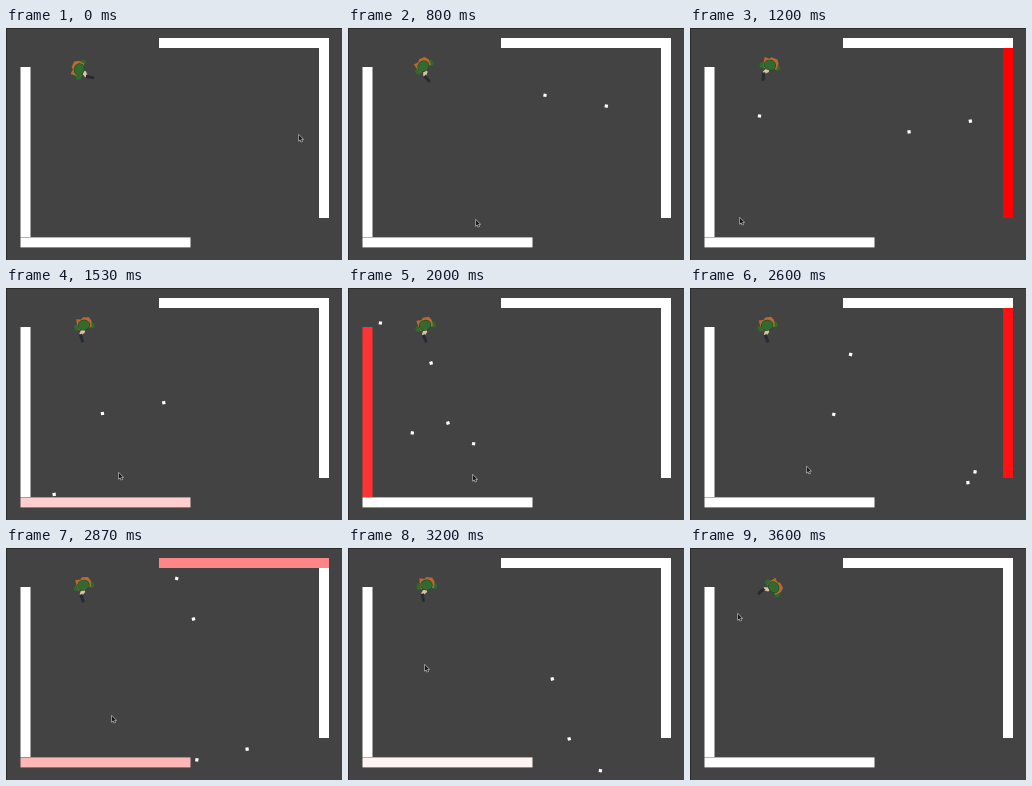
These frames come from a looping animation (336 px wide and 232 px high, 3800 ms). An HTML page with a canvas:

```html
<!DOCTYPE html>
<html lang="en">
<head>
<meta charset="utf-8">
<title>Bouncing bullets</title>
<style>
  html, body { margin: 0; height: 100%; overflow: hidden; background: #434343; }
  canvas { display: block; }
</style>
</head>
<body>
<canvas id="stage" width="336" height="232"></canvas>
<script>
const W = 336, H = 232, LOOP = 3800, STEP = 1000 / 15;
const SPEED = 24.9, RADIUS = 0.8, SHOT_GAP = 2.5;   // lengths in px, times in steps
const ctx = document.getElementById('stage').getContext('2d');
const player = { x: 79, y: 43 };

const wall = (x, y, w, h) => ({ x, y, w, h, hits: [] });
const walls = [
  wall(153, 10, 170, 10), wall(313, 20, 10, 170),
  wall(14.5, 39, 10, 170), wall(14.5, 209.4, 170, 10)
];

// Two shots, one, then two more
const bullets = [
  ...volley(2, 5.2, 91.3, 48.6, 10),
  ...volley(1, 16.7, 75.1, 56.1, 99.9),
  ...volley(2, 26.8, 78.4, 58.3, 74.3)
];

// Where the pointer turns or rests: [step, x, y]
const stops = [
  [8, 293, 107], [12, 128, 192], [16, 50, 190], [18, 50, 190],
  [23, 113, 185], [29, 125, 187], [36, 125, 187], [43, 106, 168], [53, 48, 66]
];

function volley(count, step, x, y, degrees) {
  return Array.from({ length: count }, (_, i) =>
    fly(step + i * SHOT_GAP, x, y, degrees * Math.PI / 180));
}

// Follows a bullet until it leaves the stage; returns its pose at each whole step
function fly(step, x, y, angle) {
  const poses = {}, dt = 0.01;
  let vx = SPEED * Math.cos(angle), vy = SPEED * Math.sin(angle);
  const inX = (w, px) => px > w.x - RADIUS && px < w.x + w.w + RADIUS;
  const inY = (w, py) => py > w.y - RADIUS && py < w.y + w.h + RADIUS;
  for (let t = step; x > 0 && x < W && y > 0 && y < H; t += dt) {
    if (Math.floor(t) > Math.floor(t - dt)) poses[Math.floor(t)] = { x, y, angle: Math.atan2(vy, vx) };
    const nx = x + vx * dt, ny = y + vy * dt;
    const hit = walls.find(w => inX(w, nx) && inY(w, ny));
    if (hit) {
      hit.hits.push(t);
      if (inX(hit, x)) vy = -vy; else vx = -vx;
    } else {
      x = nx;
      y = ny;
    }
  }
  return poses;
}

function pointerAt(k) {
  const i = stops.findIndex(s => k < s[0]);
  const b = stops.at(i), a = stops[Math.max(0, i - 1)] ?? b;
  if (i < 1) return { x: b[1], y: b[2] };
  const u = (k - a[0]) / (b[0] - a[0]);
  return { x: a[1] + (b[1] - a[1]) * u, y: a[2] + (b[2] - a[2]) * u };
}

function placed({ x, y }, angle, draw) {
  ctx.save();
  ctx.translate(x, y);
  ctx.rotate(angle);
  draw();
  ctx.restore();
}

function shape(points, fill, stroke) {
  ctx.beginPath();
  points.forEach(([x, y]) => ctx.lineTo(x, y));
  ctx.closePath();
  paint(fill, stroke);
}

function oval(x, y, rx, ry, fill, stroke) {
  ctx.beginPath();
  ctx.ellipse(x, y, rx, ry, 0, 0, 7);
  paint(fill, stroke);
}

function paint(fill, stroke) {
  if (stroke) { ctx.strokeStyle = stroke; ctx.stroke(); }
  ctx.fillStyle = fill;
  ctx.fill();
}

// A hit turns a wall red and back to white within three steps
function drawWall({ x, y, w, h, hits }, k) {
  const age = k - Math.max(...hits.filter(t => t <= k));
  const c = Math.round(255 * Math.min(1, Math.abs(age - 1.3) / 1.5));
  ctx.fillStyle = `rgb(255,${c},${c})`;
  ctx.fillRect(x, y, w, h);
}

function drawBullet(pose) {
  placed(pose, pose.angle, () => {
    ctx.fillStyle = '#fff';
    ctx.fillRect(-1.6, -1.6, 3.2, 3.2);
  });
}

function drawPlayer() {
  ctx.lineWidth = 1.2;
  oval(-4.5, -8, 3, 2.4, '#2c6b2c');
  oval(-4.5, 8, 3, 2.4, '#2c6b2c');
  shape([[-13, -6], [-9, -8], [-3, -7], [-2, 6], [-8, 7], [-13, 7], [-12, 2], [-14, 0]], '#b9692f');
  shape([[-2, 0], [1, 0], [4, 4], [2, 6], [-1, 4]], '#dcc3a0');
  shape([[2, 3.2], [10.5, 2.6], [11, 5.4], [3, 6.4]], '#262c33');
  oval(-6, 0.2, 4.8, 5.6, '#336a30', '#1f4a22');
}

function drawPointer() {
  ctx.scale(0.8, 0.8);
  ctx.lineWidth = 1.4;
  shape([[0, 0], [0, 7], [1.6, 5.6], [2.8, 8.3], [3.9, 7.8], [2.8, 5.2], [4.9, 5]], '#181818', '#ccc');
}

function draw(time) {
  const k = Math.floor((time % LOOP + 4) / STEP);
  ctx.fillStyle = '#2b2b2b';
  ctx.fillRect(0, 0, W, H);
  ctx.fillStyle = '#434343';
  ctx.fillRect(1, 1, W, H);
  walls.forEach(w => drawWall(w, k));
  bullets.forEach(poses => poses[k] && drawBullet(poses[k]));
  const aim = pointerAt(k - 1);   // the player turns one step late
  placed(player, Math.atan2(aim.y - player.y, aim.x - player.x), drawPlayer);
  placed(pointerAt(k), 0, drawPointer);
}

let start;
function tick(now) {
  start ??= now;
  draw(now - start);
  requestAnimationFrame(tick);
}
requestAnimationFrame(tick);
</script>
</body>
</html>
```
